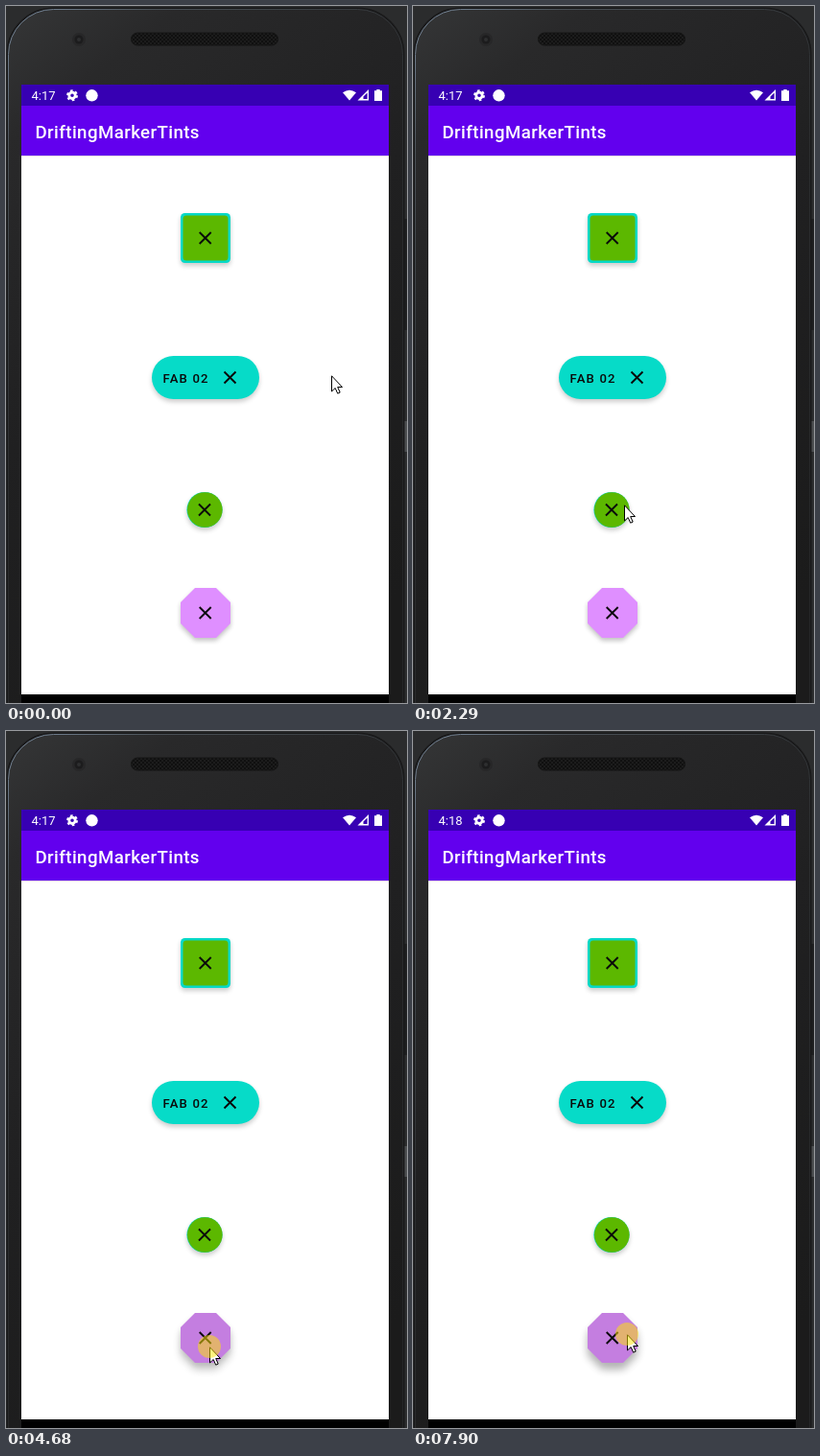
Recreate the animation shown at these times as an HTML page. Size 418x727 px, loop 8 s.

```html
<!DOCTYPE html>
<html lang="en">
<head>
<meta charset="utf-8">
<title>Button ripples</title>
<style>
  html, body { margin: 0; width: 100%; height: 100%; overflow: hidden; background: #2b2c2d; }
  svg { display: block; width: 418px; height: 727px; }
  text { font-family: Roboto, "Noto Sans", sans-serif; }
  .medium { font-weight: 500; }
  .cross { fill: none; stroke: #0a0a0a; stroke-width: 1.9; }
</style>
</head>
<body>
<svg viewBox="0 0 418 727">
  <defs>
    <linearGradient id="shell" x1="0" y1="0" x2=".4" y2="1">
      <stop offset="0" stop-color="#353637"/>
      <stop offset=".15" stop-color="#29292a"/>
      <stop offset=".5" stop-color="#202021"/>
      <stop offset="1" stop-color="#1b1b1b"/>
    </linearGradient>
    <linearGradient id="rim" x1="0" y1="0" x2=".5" y2="1">
      <stop offset="0" stop-color="#7d8ea2"/>
      <stop offset=".15" stop-color="#4a5157"/>
      <stop offset=".5" stop-color="#2b2d2f"/>
      <stop offset="1" stop-color="#252627"/>
    </linearGradient>
    <pattern id="mesh" width="4" height="4" patternUnits="userSpaceOnUse">
      <rect width="4" height="4" fill="#101010"/>
      <circle cx="1" cy="1" r=".8" fill="#2a2a2a"/>
      <circle cx="3" cy="3" r=".8" fill="#2a2a2a"/>
    </pattern>
    <filter id="soft" x="-50%" y="-50%" width="200%" height="200%"><feGaussianBlur stdDeviation="2.8"/></filter>
    <filter id="softer" x="-50%" y="-50%" width="200%" height="200%"><feGaussianBlur stdDeviation="4.5"/></filter>
    <path id="x" class="cross" d="M-6 -6L6 6M6 -6L-6 6"/>
    <path id="octagon" d="M197 607H219L234 622V644L219 659H197L182 644V622Z"/>
    <circle id="disc" cx="207" cy="525.5" r="18.6"/>
    <rect id="pill" x="152" y="365" width="112" height="45" rx="22.5"/>
    <rect id="tile" x="182" y="216" width="52" height="52" rx="4.5"/>
    <clipPath id="inDisc"><use href="#disc"/></clipPath>
    <clipPath id="inOctagon"><use href="#octagon"/></clipPath>
  </defs>

  <!-- phone shell -->
  <rect width="418" height="727" fill="#2b2c2d"/>
  <rect x="414" y="222" width="4" height="116" fill="#1d1e1f"/>
  <rect x="414" y="433" width="4" height="32" fill="#4b4d4f"/>
  <rect x="1.5" y="2.5" width="413" height="800" rx="48" fill="url(#shell)" stroke="#19191a" stroke-width="2"/>
  <rect x="2.5" y="3.5" width="411" height="800" rx="47" fill="none" stroke="url(#rim)"/>
  <rect x="130.5" y="28" width="153" height="13" rx="6.5" fill="url(#mesh)" stroke="#141414"/>
  <circle cx="76" cy="35" r="7" fill="#272728"/>
  <circle cx="76" cy="35" r="4.5" fill="#1c1c1d"/>
  <circle cx="76" cy="35" r="2" fill="#2e2f30"/>

  <!-- screen -->
  <rect x="16" y="82" width="383" height="645"/>
  <rect x="16" y="104" width="383" height="614" fill="#fff"/>
  <rect x="16" y="156" width="383" height="1" fill="#000" opacity=".1"/>
  <rect x="16" y="82" width="383" height="22" fill="#3700b3"/>
  <rect x="16" y="104" width="383" height="52" fill="#6200ee"/>
  <text id="clock" x="26.5" y="98" font-size="13" fill="#fff">4:17</text>
  <g fill="none" stroke="#fff">
    <circle cx="69" cy="93.3" r="3.2" stroke-width="2.8"/>
    <circle cx="69" cy="93.3" r="5" stroke-width="2" stroke-dasharray="2.6 2.636"/>
  </g>
  <circle cx="89.5" cy="93.3" r="6.2" fill="#fff"/>
  <g fill="#fff">
    <path d="M351 90.2Q358 85.2 365 90.2L358 98.5Z"/>
    <path d="M378 87V98.5H366.5Z"/>
    <path d="M376.6 90.5V97.1H372.5V94.6Z" fill="#3700b3"/>
    <path d="M386.3 87H389.7V88.3H392V99H384V88.3H386.3Z"/>
  </g>
  <text class="medium" x="30.5" y="137.5" font-size="18.7" letter-spacing=".4" fill="#fff">DriftingMarkerTints</text>

  <!-- resting shadows -->
  <g filter="url(#soft)" opacity=".2" transform="translate(0 3)">
    <use href="#tile"/><use href="#pill"/><use href="#disc"/>
  </g>

  <use href="#tile" fill="#06d9c7"/>
  <rect x="184.5" y="218.5" width="47" height="47" rx="3.5" fill="#5cb800"/>
  <use href="#x" x="207.7" y="242"/>

  <use href="#pill" fill="#06dbc8"/>
  <text class="medium" x="163.5" y="392.7" font-size="13.1" letter-spacing="1.17" fill="#0a0a0a">FAB 02</text>
  <use href="#x" x="233.5" y="387.5"/>

  <use href="#disc" fill="#06d9c7"/>
  <circle cx="207.3" cy="525.5" r="18.3" fill="#5cb800"/>
  <g clip-path="url(#inDisc)"><circle id="discRipple" fill="#f00"/></g>
  <use href="#x" x="207" y="525.5"/>

  <g id="lowShade" filter="url(#soft)"><use href="#octagon" y="3"/></g>
  <g id="highShade" filter="url(#softer)"><use href="#octagon" y="7"/></g>
  <use href="#octagon" fill="#df8fff"/>
  <g clip-path="url(#inOctagon)"><circle id="octagonRipple"/></g>
  <use href="#x" x="207.7" y="633"/>

  <path id="cursor" d="M.5 .8V17L4.2 13.5L6.7 19.2L9.2 18.1L6.7 12.5H11.5Z" fill="#fff" stroke="#000" stroke-linejoin="round"/>
  <circle id="halo" r="12" fill="#ffe600" fill-opacity=".5"/>
</svg>
<script>
const LOOP = 8000, STEP = 70, FADE = 150, REACH = 44;
const $ = id => document.getElementById(id);

const home = [339, 385], besideDisc = [220, 520], onOctagon = [212, 642], octagonEdge = [223, 629];
const middle = { disc: [207, 525], octagon: [208, 633] };
const tint = { disc: 0.34, octagon: 0.12 };

// Each move bends towards a control point.
const moves = [
  { start: 700, steps: 1, bend: home, to: [339, 388] },
  { start: 1050, steps: 11, bend: [309, 454], to: besideDisc },
  { start: 3720, steps: 11, bend: [174, 715], to: onOctagon },
  { start: 5810, steps: 5, bend: [217, 636], to: octagonEdge }
];
const presses = [
  { start: 1880, end: 2130, at: besideDisc, button: "disc" },
  { start: 3020, end: 3360, at: besideDisc, button: "disc" },
  { start: 4530, end: 5740, at: onOctagon, button: "octagon" },
  { start: 6410, end: 7150, at: octagonEdge, button: "octagon" },
  { start: 7690, end: LOOP, at: octagonEdge, button: "octagon" }
];

const clamp = v => Math.min(1, Math.max(0, v));
const mix = (a, b, p) => a + (b - a) * p;
const mixPoint = (a, b, p) => a.map((v, i) => mix(v, b[i], p));
const easeOut = p => 1 - (1 - p) ** 2;
const stepped = (t, start, steps) => clamp((Math.floor((t - start) / STEP) + 1) / steps);

function set(id, attrs) {
  for (const name in attrs) $(id).setAttribute(name, attrs[name]);
}

function cursorAt(t) {
  return moves.reduce((from, { start, steps, bend, to }) => {
    const p = easeOut(stepped(t, start, steps));
    return mixPoint(mixPoint(from, bend, p), mixPoint(bend, to, p), p);
  }, home).map(Math.round);
}

// Grows from the pointer to the middle of the button, then fades; returns its strength.
function ripple(button, t) {
  const press = presses.findLast(p => p.button === button && p.start <= t);
  if (!press) {
    set(button + "Ripple", { r: 0 });
    return 0;
  }
  const grow = stepped(t, press.start, 4);
  const fade = 1 - clamp((t - press.end) / FADE);
  const [cx, cy] = mixPoint(press.at, middle[button], grow);
  set(button + "Ripple", { cx, cy, r: REACH * grow, opacity: tint[button] * fade });
  return grow * fade;
}

function draw(t) {
  const [x, y] = cursorAt(t);
  const held = presses.some(p => t >= p.start && t < p.end);
  set("cursor", { transform: `translate(${x} ${y})` });
  set("halo", { cx: x, cy: y, opacity: held ? 1 : 0 });

  ripple("disc", t);
  const lift = ripple("octagon", t);
  set("lowShade", { opacity: 0.24 * (1 - lift) });
  set("highShade", { opacity: 0.3 * lift });

  $("clock").textContent = t < 5950 ? "4:17" : "4:18";
}

const begin = performance.now();
function tick() {
  draw((performance.now() - begin) % LOOP);
  requestAnimationFrame(tick);
}
tick();
</script>
</body>
</html>
```
